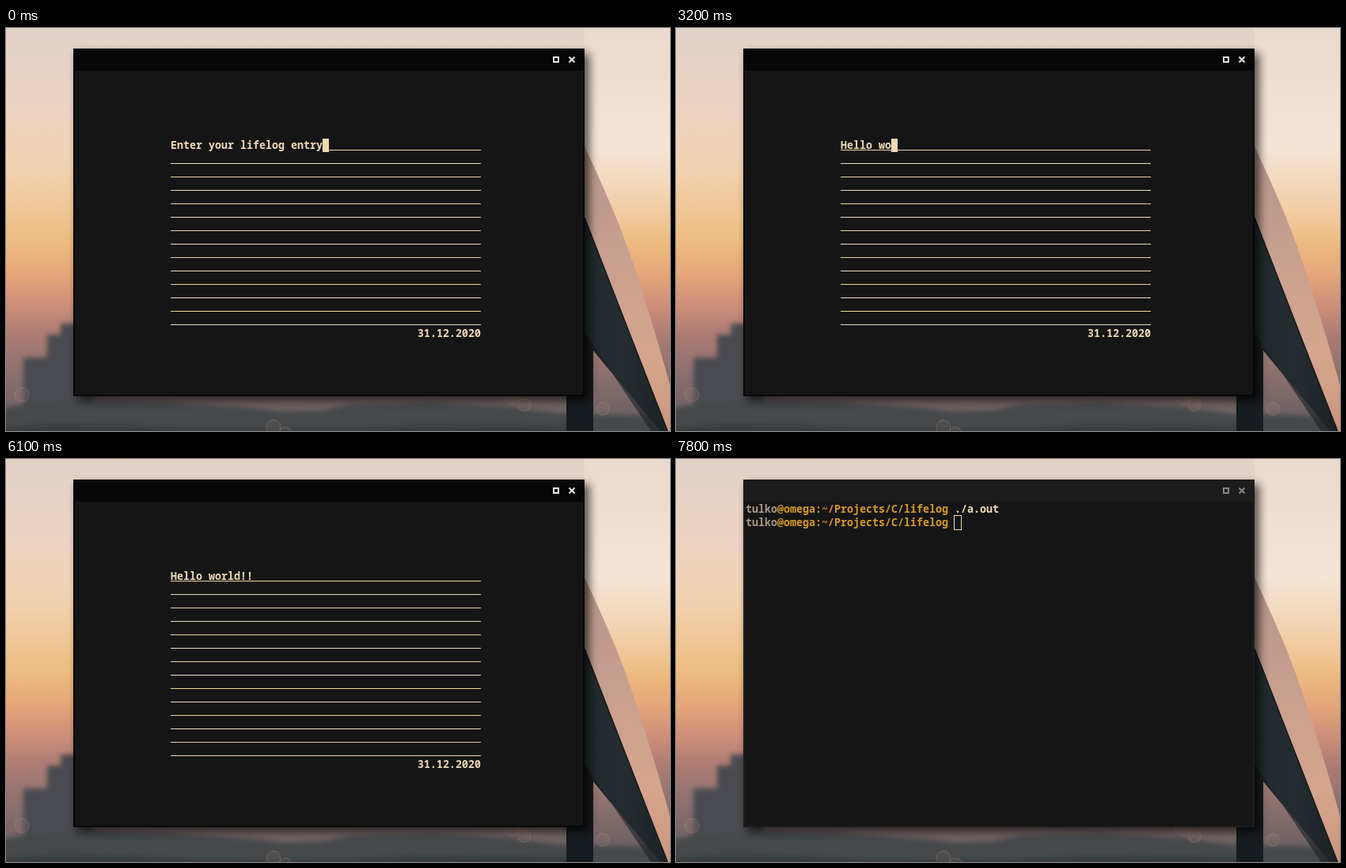
An HTML page for the animation above (7.9 s loop, 839x510 px).

```html
<!DOCTYPE html>
<html lang="en">
<head>
<meta charset="utf-8">
<title>Lifelog</title>
<style>
  html, body { margin: 0; width: 100%; height: 100%; overflow: hidden; background: #151515; }
  svg { display: block; }
  text {
    font: 600 13.333px "Noto Sans Mono", "DejaVu Sans Mono", monospace;
    fill: #eedab5;
    white-space: pre;
  }
  .user { fill: #a89984; }
  .path { fill: #d79921; }
  .window { --frame: #070707; --icon: #e4e4e4; }
  .window.idle { --frame: #1c1c1c; --icon: #858585; }
  .frame { fill: var(--frame); }
  .icon { fill: none; stroke: var(--icon); stroke-width: 2; }
</style>
</head>
<body>
<svg width="839" height="510" viewBox="0 0 839 510">
  <defs>
    <linearGradient id="sky" x1="0" y1="0" x2="0" y2="1">
      <stop offset="0" stop-color="#e2d2c8"/>
      <stop offset=".2" stop-color="#ecd3c3"/>
      <stop offset=".35" stop-color="#f1d2b0"/>
      <stop offset=".44" stop-color="#f0c899"/>
      <stop offset=".53" stop-color="#edbc80"/>
      <stop offset=".61" stop-color="#e5a679"/>
      <stop offset=".68" stop-color="#d0917a"/>
      <stop offset=".76" stop-color="#ad7c74"/>
      <stop offset=".86" stop-color="#8b706f"/>
      <stop offset="1" stop-color="#625b5e"/>
    </linearGradient>
    <linearGradient id="haze" x1="0" y1="0" x2="0" y2="1">
      <stop offset="0" stop-color="#f0dfd3" stop-opacity=".5"/>
      <stop offset=".55" stop-color="#f5e5d8" stop-opacity=".95"/>
      <stop offset="1" stop-color="#f3d6b4" stop-opacity="0"/>
    </linearGradient>
    <linearGradient id="lit" x1="0" y1="150" x2="0" y2="510" gradientUnits="userSpaceOnUse">
      <stop offset="0" stop-color="#b5958c"/>
      <stop offset=".4" stop-color="#c8a08f"/>
      <stop offset=".75" stop-color="#d6a58c"/>
      <stop offset="1" stop-color="#cb957f"/>
    </linearGradient>
    <linearGradient id="dark" x1="731" y1="0" x2="836" y2="0" gradientUnits="userSpaceOnUse">
      <stop offset="0" stop-color="#20292d"/>
      <stop offset=".5" stop-color="#242c30"/>
      <stop offset="1" stop-color="#1c2226"/>
    </linearGradient>
    <filter id="soft" x="-10%" y="-30%" width="120%" height="160%"><feGaussianBlur stdDeviation="3"/></filter>
    <filter id="shadow" x="-10%" y="-10%" width="120%" height="120%"><feGaussianBlur stdDeviation="6"/></filter>
  </defs>

  <rect width="839" height="510" fill="url(#sky)"/>
  <rect x="731" width="108" height="270" fill="url(#haze)"/>
  <g filter="url(#soft)">
    <path d="M22 520V417H52V388H69V374H110V520Z" fill="#494c51"/>
    <path d="M-20 530V484L24 476 90 470 200 473 300 480 350 485 400 484 440 476 540 474 640 480 700 488 760 490 860 492V530Z" fill="#44484c"/>
    <path d="M-20 530V506L60 500 150 501 240 507 420 508 520 501 720 503V530Z" fill="#383d41"/>
  </g>
  <g id="bokeh" fill="#c99a86" fill-opacity=".09" stroke="#c99a86" stroke-opacity=".3"></g>

  <path d="M731 150Q751 192 771 240 789 285 806 340 824 397 839 452V510H833L731 240Z" fill="url(#lit)"/>
  <path d="M731 240L836 510H826L742 408V510H708V455H731Z" fill="url(#dark)"/>
  <path d="M708 455H731V385L742 408V510H708Z" fill="#161c1f"/>
  <path d="M731 385L742 408 826 510H815Z" fill="#181e22" opacity=".6"/>
  <path d="M731 240L836 510" stroke="#15191c" stroke-width="1.5"/>

  <rect x="90" y="32" width="647" height="440" fill="#000" opacity=".65" filter="url(#shadow)"/>
  <g class="window" id="window">
    <rect class="frame" x="85" y="26" width="646" height="440"/>
    <rect x="87" y="54" width="642" height="410" fill="#151515"/>
    <rect class="icon" x="692" y="37" width="6" height="6"/>
    <path class="icon" d="M711.5 36.5l7 7m0-7l-7 7"/>
    <g id="journal">
      <g id="rules"></g>
      <text id="entry" x="208" y="153"></text>
      <text x="520" y="391">31.12.2020</text>
    </g>
    <g id="shell">
      <text x="88" y="68"><tspan class="user">tulko</tspan><tspan class="path">@omega:~/Projects/C/lifelog</tspan> ./a.out</text>
      <text x="88" y="85"><tspan class="user">tulko</tspan><tspan class="path">@omega:~/Projects/C/lifelog</tspan></text>
    </g>
    <rect id="cursor" stroke="#eedab5"/>
  </g>
</svg>

<script>
const LOOP = 7900, CELL = 8, ROW = 17, LEFT = 208, TOP = 140;
const PROMPT = 'Enter your lifelog entry', ENTRY = 'Hello world!!';
const KEYS = [2150, 2350, 2450, 2550, 2750, 2850, 2950, 3150, 3350, 3450, 3650, 3950, 4150];
const EXIT = 7150, BLUR = 7650, BLINK = 600;

const $ = id => document.getElementById(id);
const add = (parent, tag, attrs) => {
  const node = document.createElementNS('http://www.w3.org/2000/svg', tag);
  set(node, attrs);
  return parent.appendChild(node);
};
function set(node, attrs) {
  for (const key in attrs) node.setAttribute(key, attrs[key]);
}

const rules = Array.from({ length: 14 }, (_, i) => add($('rules'), 'rect', {
  x: LEFT, y: TOP + 14 + i * ROW, width: 392, height: 1,
  fill: i % 2 ? '#ecddc4' : '#ebd49c'
}));

for (const [cx, cy, r] of [[640, 468, 9], [655, 477, 8], [754, 482, 8], [338, 505, 9], [353, 513, 8], [20, 464, 9]])
  add($('bokeh'), 'circle', { cx, cy, r });

// The cursor stays lit for a while after each key, then blinks.
const lit = (t, since) => Math.floor((t - since) / BLINK) % 2 === 0;

function drawCursor(x, y, visible, hollow) {
  const pad = hollow ? 0.5 : 0;
  set($('cursor'), {
    x: x - pad, y: y - pad, width: CELL + 2 * pad, height: ROW + 2 * pad,
    fill: hollow ? 'none' : '#eedab5',
    'stroke-width': hollow ? 1 : 0,
    visibility: visible ? 'visible' : 'hidden'
  });
}

function draw(t) {
  const done = t >= EXIT, idle = t >= BLUR;
  $('window').classList.toggle('idle', idle);
  $('journal').style.display = done ? 'none' : '';
  $('shell').style.display = done ? '' : 'none';
  if (done) return drawCursor(352, 72, true, idle);

  const typed = KEYS.filter(k => k <= t).length;
  const text = typed ? ENTRY.slice(0, typed) : PROMPT;
  $('entry').textContent = text;
  const x = LEFT + text.length * CELL;
  const start = typed ? LEFT : x;
  set(rules[0], { x: start, width: 600 - start });
  drawCursor(x, TOP, lit(t, typed ? KEYS[typed - 1] : -50), false);
}

const begin = performance.now();
function tick() {
  draw((performance.now() - begin) % LOOP);
  requestAnimationFrame(tick);
}
tick();
</script>
</body>
</html>
```
